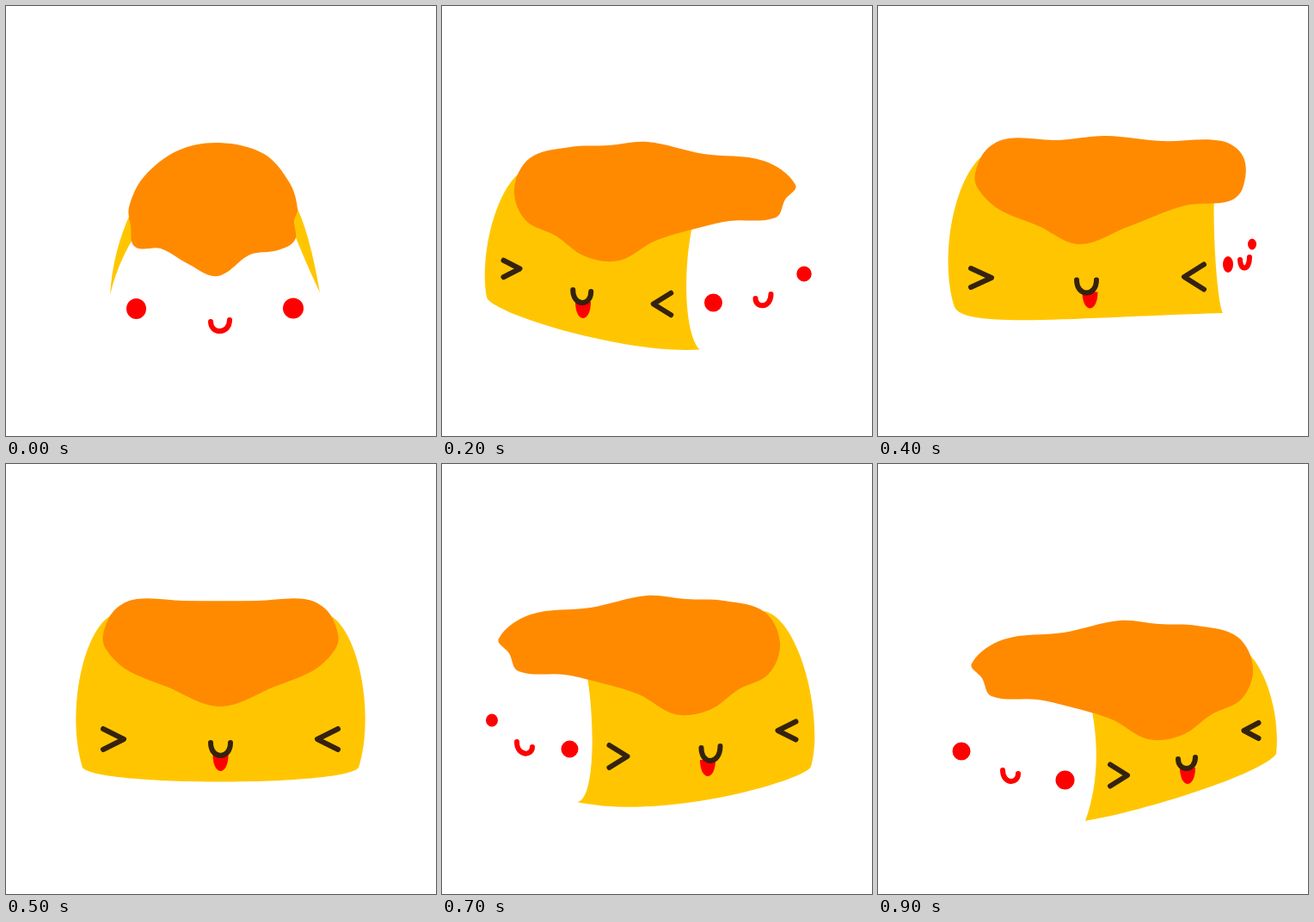
Write an HTML page that moves like this. It is 500x500 px and loops after 1 s.

```html
<!DOCTYPE html>
<html lang="en">
<head>
<meta charset="utf-8">
<title>Spinning pudding</title>
<style>
  html, body { margin: 0; width: 100%; height: 100%; overflow: hidden; background: #fff; }
  svg { display: block; width: 100%; height: 100%; }
  .line { fill: none; stroke-linecap: round; stroke-linejoin: round; stroke-width: 6; }
</style>
</head>
<body>
<svg viewBox="0 0 500 500">
  <g id="base">
    <path id="body" fill="#ffc600"/>
    <path id="tongue" fill="#f00"/>
    <path id="eyes" class="line" stroke="#35220f"/>
    <path id="grin" class="line" stroke="#35220f"/>
    <path id="cheeks" fill="#f00"/>
    <path id="smile" class="line" stroke="#f00"/>
  </g>
  <path id="cap" fill="#ff8a00"/>
</svg>
<script>
const STEP = 100;
const $ = id => document.getElementById(id);

// Closed smooth curve through "x,y x,y ..."; handles follow the neighbours' direction
function blob(text) {
  const pts = text.split(' ').map(p => p.split(',').map(Number));
  const n = pts.length;
  const at = i => pts[(i + n) % n];
  const gap = (p, q) => Math.hypot(q[0] - p[0], q[1] - p[1]);
  const handle = (p, from, to, len) =>
    p.map((v, k) => v + (to[k] - from[k]) * len / gap(from, to) / 3);
  let d = 'M' + pts[0];
  for (let i = 0; i < n; i++) {
    const [a, b, c, e] = [at(i - 1), at(i), at(i + 1), at(i + 2)];
    const len = gap(b, c);
    d += `C${handle(b, a, c, len)} ${handle(c, e, b, len)} ${c}`;
  }
  return d + 'Z';
}

// A negative width points the tip to the left
const chevron = ([x, y, w, h]) =>
  `M${x - w / 2} ${y - h / 2}L${x + w / 2} ${y}L${x - w / 2} ${y + h / 2}`;

const cup = ([x, y, w, h, tilt = 0]) => {
  const l = x - w / 2, r = x + w / 2, low = y + h * 4 / 3;
  return `M${l} ${y - tilt}C${l} ${low} ${r} ${low} ${r} ${y + tilt}`;
};

const oval = ([x, y, rx, ry]) =>
  `M${x - rx} ${y}a${rx} ${ry} 0 1 0 ${2 * rx} 0a${rx} ${ry} 0 1 0 ${-2 * rx} 0`;

const back = {
  body: 'M146 238Q124 285 121 336Q132 288 165 245ZM337 232Q352 260 365 333Q344 290 320 225Z',
  cap: '143,234 160,199 200,168 248,159 300,172 330,206 339,236 335,250 336,272 316,284 284,289 246,314 212,300 180,282 150,280 145,256',
  cheeks: [[151.5, 352, 11.5, 12], [334, 351.5, 12, 12]],
  smile: [249, 366, 22, 12, -1]
};

const quarter = {
  body: 'M72 212C46 232 30 290 35 333C50 356 190 400 257 411C242 370 240 320 252 270Z',
  cap: '69,228 86,191 125,174 200,168 270,181 330,188 366,216 347,250 326,273 284,265 246,280 212,291 163,310 128,289 92,278',
  eyes: [[64, 306, 17, 18], [218, 358, -20, 25]],
  grin: [139, 338, 20, 12, 1],
  drift: -1,
  cheeks: [[280.5, 363.5, 11, 11], [401, 330, 10.5, 10.5]],
  smile: [344, 354, 18, 11, -2]
};

const turned = {
  body: 'M126 166C84 171 54 290 70 347C78 363 240 410 342 388C318 386 322 270 333 230Z',
  cap: '100,200 118,164 165,151 210,149 255,145 320,159 390,167 427,195 415,212 404,233 350,237 318,244 264,260 222,283 182,278 148,254 113,236',
  eyes: [[98, 305, 21, 21], [294, 335, -21, 26]],
  grin: [186.5, 324, 22, 16, 1],
  drift: 3.5,
  cheeks: [[350.5, 326.5, 10, 10], [441, 293, 7, 7.5]],
  smile: [403, 321, 18, 10.5, -3]
};

const side = {
  body: 'M128 170C90 190 70 290 89 350C100 376 230 362 401 357C395 345 389 270 391 215Z',
  cap: '113,195 126,167 152,154 207,156 265,151 330,157 400,157 425,176 424,212 408,227 357,232 290,257 234,277 187,256 140,236 116,212',
  eyes: [[120, 316, 24, 22], [367.5, 315, -23, 29]],
  grin: [242.5, 318.5, 23, 15],
  drift: 4,
  cheeks: [[407, 300.5, 6, 9.5], [435, 277, 5, 6.5]],
  smile: [426.5, 293.5, 11, 11, -1.5]
};

const front = {
  body: 'M124 172C88 190 70 290 89 350C105 372 394 372 410 350C429 290 411 190 375 172Z',
  cap: '113,195 126,167 152,154 207,156 292,156 347,154 373,167 386,195 383,212 359,236 312,256 249,279 187,256 140,236 116,212',
  eyes: [[125, 317, 24, 24], [374, 317, -24, 24]],
  grin: [249.5, 321, 23, 15],
  drift: 0
};

// Halfway between two poses of the same structure
function halfway(a, b) {
  const number = /-?\d[\d.]*/g;
  const other = JSON.stringify(b).match(number);
  let i = 0;
  return JSON.parse(JSON.stringify(a).replace(number, x => (+x + +other[i++]) / 2));
}

const eighth = {
  ...halfway({ ...quarter, cap: '' }, { ...turned, cap: '' }),
  cap: turned.cap
};

const move = (x, y) => `translate(${x} ${y})`;
const flip = (x, y) => `translate(${x} ${y}) scale(-1 1)`;

// [pose, base transform, cap transform]
const steps = [
  [back],
  [quarter],
  [eighth, '', move(-16, 13)],
  [turned],
  [side],
  [front, move(0, 3), move(0, 3)],
  [side, flip(499, 6), flip(499.5, 6.5)],
  [turned, flip(499, 5), flip(493, 8)],
  [eighth, flip(498.5, 4.5), flip(514, 22)],
  [{ ...quarter, cap: turned.cap }, flip(498, 4), flip(536, 37)]
];

function tongue([x, y, , h], drift) {
  return cup([x + drift, y + h - 1, 18, 19]) + 'Z';
}

function draw(step) {
  const [pose, base = '', cap = ''] = steps[step];
  const { eyes = [], cheeks = [], grin, smile, drift } = pose;
  const paths = {
    body: pose.body,
    cap: blob(pose.cap),
    eyes: eyes.map(chevron).join(''),
    cheeks: cheeks.map(oval).join(''),
    grin: grin ? cup(grin) : '',
    tongue: grin ? tongue(grin, drift) : '',
    smile: smile ? cup(smile) : ''
  };
  for (const id in paths) $(id).setAttribute('d', paths[id]);
  $('base').setAttribute('transform', base);
  $('cap').setAttribute('transform', cap);
}

const start = performance.now();
function tick() {
  const t = Math.max(0, performance.now() - start);
  draw(Math.floor(t / STEP) % steps.length);
  requestAnimationFrame(tick);
}
tick();
</script>
</body>
</html>
```
